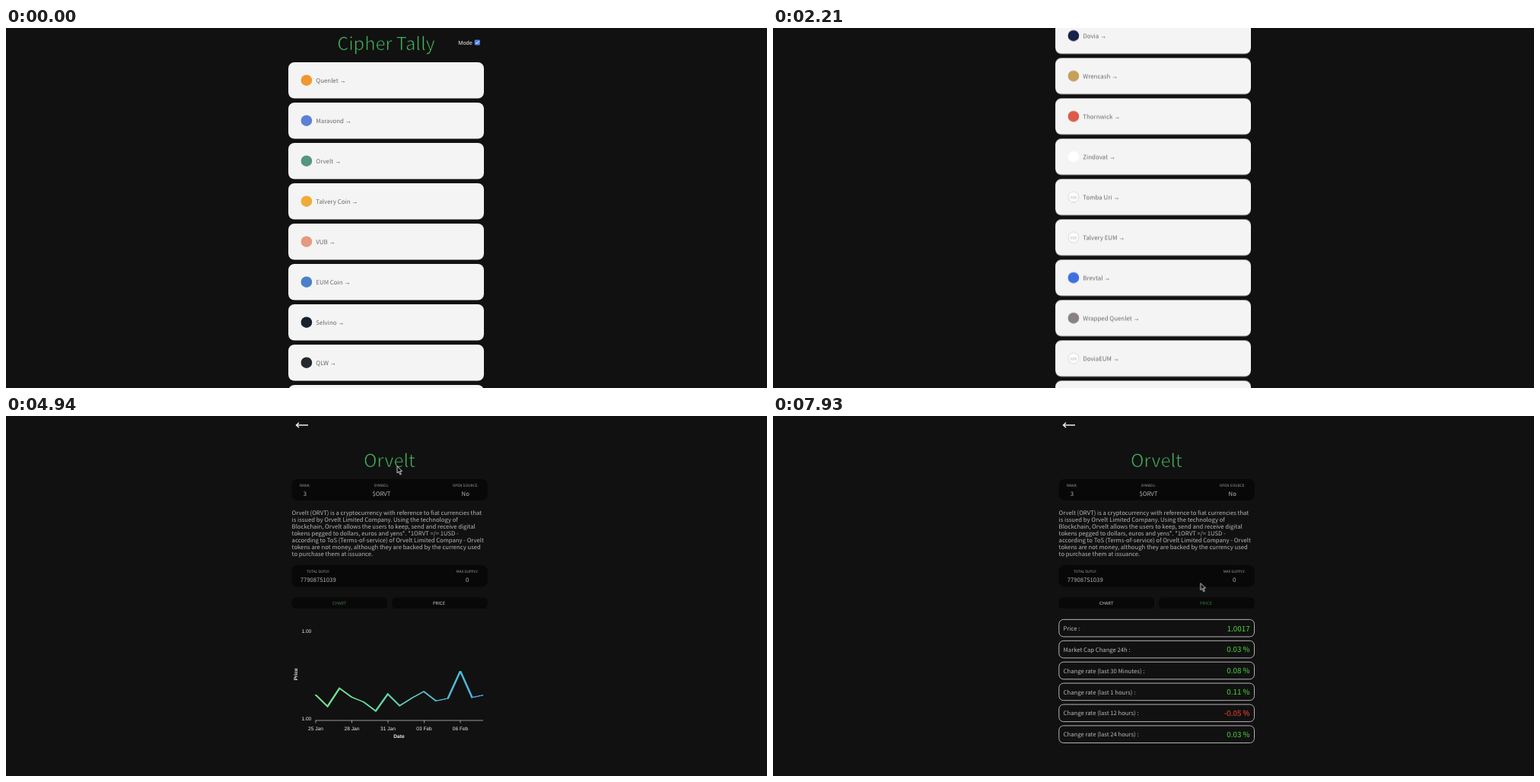
Recreate the animation shown at these times as an HTML page. Size 1000 by 473 pixels, loop 8000 ms.

```html
<!DOCTYPE html>
<html lang="en">
<head>
<meta charset="utf-8">
<title>Coin tracker</title>
<style>
  html, body { margin: 0; width: 100%; height: 100%; overflow: hidden; background: #111; }
  svg { display: block; width: 100vw; height: 100vh; }
  text {
    font: 300 7.7px "Noto Sans CJK JP", "Noto Sans CJK SC", "Open Sans", sans-serif;
    fill: #b8b8b8;
    text-rendering: geometricPrecision;
    white-space: pre;
  }
  .mid { text-anchor: middle; }
  .end { text-anchor: end; }
  /* The background-coloured outline thins the letters. */
  .title { font-size: 23.5px; fill: #45b15d; stroke: #111; stroke-width: .65; text-anchor: middle; }
  .label { font-size: 4.8px; fill: #a0a0a0; text-anchor: middle; }
  .tab { font-size: 5.75px; text-anchor: middle; }
  .name { font-size: 7.9px; font-weight: 400; fill: #6a6a6a; }
  .name tspan { font: 8px "Liberation Sans", Arial, sans-serif; fill: #333; }
  .value { font-size: 9.8px; font-weight: 400; fill: #4cd63c; text-anchor: end; }
  .value.down { fill: #c03e2e; stroke: #a83426; stroke-width: .35; }
  .axis { font: 6.6px "Liberation Sans", Arial, sans-serif; fill: #eee; }
  .bold { font-weight: 700; }
  .tiny { font-size: 1.8px; fill: #777; text-anchor: middle; }
  .panel { fill: #080808; }
  .row { fill: none; stroke: #b4b4b4; }

  .home, .scroll, .detail, .loading, .info, .wait, .chart, .line, .prices,
  .cursor, .hand, .arrow, .chartTab, .priceTab {
    animation: 8s step-end infinite;
  }
  .home { animation-name: home; }
  .scroll { animation-name: scroll; }
  .detail { animation-name: detail; }
  .loading { animation-name: loading; }
  .info { animation-name: info; }
  .wait { animation-name: wait; }
  .chart { animation-name: chart; }
  .line { animation-name: grow; transform-origin: 0 400px; }
  .prices { animation-name: prices; }
  .cursor { animation-name: move; }
  .hand { animation-name: hand; }
  .arrow { animation-name: arrow; }
  .chartTab { animation-name: chartTab; }
  .priceTab { animation-name: priceTab; }

  @keyframes home { 0% { opacity: 1 } 43.875%, to { opacity: 0 } }
  @keyframes scroll {
    0% { transform: translateY(0) }
    21.125% { transform: translateY(-36.2px) }
    22.75% { transform: translateY(-140px) }
    24.375% { transform: translateY(-285px) }
    26% { transform: translateY(-430px) }
    27.625% { transform: translateY(-535.6px) }
    29.25% { transform: translateY(-585px) }
    30.875% { transform: translateY(-480px) }
    32.5% { transform: translateY(-290px) }
    34.125%, to { transform: translateY(-120.6px) }
  }
  @keyframes detail { 0% { opacity: 0 } 43.875%, to { opacity: 1 } }
  @keyframes loading { 0% { opacity: 1 } 55.25%, to { opacity: 0 } }
  @keyframes info { 0% { opacity: 0 } 55.25%, to { opacity: 1 } }
  @keyframes wait { 0% { opacity: 1 } 61.75%, to { opacity: 0 } }
  @keyframes chart { 0% { opacity: 0 } 61.75% { opacity: 1 } 79.625%, to { opacity: 0 } }
  @keyframes grow { 0% { transform: scaleY(.45) } 63.375%, to { transform: none } }
  @keyframes prices { 0% { opacity: 0 } 79.625%, to { opacity: 1 } }
  @keyframes chartTab { 0% { fill: #417a4b } 79.625%, to { fill: #d0d0d0 } }
  @keyframes priceTab { 0% { fill: #d0d0d0 } 79.625%, to { fill: #38783c } }
  @keyframes move {
    0% { opacity: 0; transform: translate(540px, 140px) }
    37.375% { opacity: 1; transform: translate(530px, 74px) }
    39% { opacity: 1; transform: translate(520px, 69px) }
    40.625% { opacity: 1; transform: translate(514px, 66px) }
    68.25% { opacity: 1; transform: translate(570px, 95px) }
    69.875% { opacity: 1; transform: translate(650px, 160px) }
    71.5% { opacity: 1; transform: translate(640px, 215px) }
    73.125% { opacity: 1; transform: translate(582.5px, 244px) }
    81.25% { opacity: 1; transform: translate(605px, 262px) }
    82.875% { opacity: 1; transform: translate(645px, 285px) }
    84.5% { opacity: 1; transform: translate(664px, 280px) }
    86.125% { opacity: 1; transform: translate(640px, 262px) }
    87.75% { opacity: 1; transform: translate(600px, 240px) }
    89.375%, to { opacity: 1; transform: translate(561.8px, 219.6px) }
  }
  @keyframes hand {
    0% { opacity: 1 } 45.5% { opacity: 0 } 73.125% { opacity: 1 } 81.25%, to { opacity: 0 }
  }
  @keyframes arrow {
    0% { opacity: 0 } 45.5% { opacity: 1 } 73.125% { opacity: 0 } 81.25%, to { opacity: 1 }
  }
</style>
</head>
<body>
<svg viewBox="0 0 1000 473">
  <defs>
    <linearGradient id="stroke" gradientUnits="userSpaceOnUse" x1="407" x2="627" y1="0" y2="0">
      <stop offset="0" stop-color="#78e58c"/>
      <stop offset=".35" stop-color="#68dda0"/>
      <stop offset=".7" stop-color="#58bfd0"/>
      <stop offset="1" stop-color="#4ab2e2"/>
    </linearGradient>
    <clipPath id="plot"><path d="M405 282h224v118H405z"/></clipPath>
  </defs>

  <g class="home"><g class="scroll">
    <text class="title" x="499.5" y="29">Cipher Tally</text>
    <text class="axis" x="594.2" y="21.6" style="font-size:7.5px">Mode</text>
    <rect x="615.7" y="15.4" width="7.2" height="7.2" rx="1.3" fill="#4f83e6"/>
    <path d="M617.3 19.1l1.4 1.5 2.7-3.2" fill="none" stroke="#fff"/>
    <g id="cards"></g>
  </g></g>

  <g class="detail">
    <path d="M397 12H381.5M385 8.8L381.5 12l3.5 3.2" fill="none" stroke="#eee" stroke-width="1.5"/>
    <text class="title" x="504" y="67">Orvelt</text>
    <text class="loading mid" x="503.7" y="90.6">loading...</text>

    <g class="info">
      <rect class="panel" x="375.5" y="83" width="257.3" height="28" rx="8"/>
      <rect class="panel" x="375.5" y="196" width="257.3" height="28.5" rx="8"/>
      <rect class="panel" x="375.5" y="238.5" width="125.5" height="14.5" rx="5.5"/>
      <rect class="panel" x="507" y="238.5" width="125.8" height="14.5" rx="5.5"/>
      <g id="facts"></g>
      <g id="about"></g>
      <text class="tab chartTab" x="438.2" y="247.8">CHART</text>
      <text class="tab priceTab" x="569" y="247.8">PRICE</text>
      <text class="wait mid" x="503.7" y="275">loading...</text>

      <g class="chart">
        <g clip-path="url(#plot)">
          <polyline class="line" fill="none" stroke="url(#stroke)" stroke-width="2.7" points="406.8,325
            422.5,359 438.2,306 454.3,332 470,346 485.8,372.5 501.7,323 517.3,357 533.4,334.5
            549,315.5 565,343 580.7,335.5 597,256 612.5,333 627,326"/>
        </g>
        <path d="M406.5 400H627" stroke="#aaa" stroke-width=".9"/>
        <g id="dates"></g>
        <text class="axis end" x="401.3" y="285">1.00</text>
        <text class="axis end" x="401.3" y="400">1.00</text>
        <text class="axis bold mid" x="516.5" y="423.2">Date</text>
        <text class="axis bold mid" transform="translate(383 339.3) rotate(-90)">Price</text>
      </g>

      <g class="prices" id="prices"></g>
    </g>
  </g>

  <g class="cursor">
    <path class="hand" fill="#eee" d="M-.9.5Q0-.6.9.5V3.6L4 4.5Q5 5 4.7 6.5L4 10H-.3L-3 6.6Q-3.2 5.3-1.9 5.6L-.9 6.4Z"/>
    <path class="arrow" fill="#111" stroke="#ddd" stroke-width=".9" d="M0 0V9L2.2 7 3.8 11 5.4 10.3 3.7 6.5 6.6 6.3Z"/>
  </g>
</svg>
<script>
  const fill = (id, items, draw) => {
    document.getElementById(id).innerHTML = items.map(draw).join('');
  };
  const text = (cls, x, y, str) => `<text class="${cls}" x="${x}" y="${y}">${str}</text>`;

  // An empty colour stands for a coin without an image.
  const coins = [
    ['Quenlet', '#f0982f'], ['Maravond', '#5f7fd6'], ['Orvelt', '#559683'],
    ['Talvery Coin', '#f0aa38'], ['VUB', '#e49a80'], ['EUM Coin', '#4a80cc'],
    ['Selvino', '#17222f'], ['QLW', '#23292f'], ['Mirelo', '#060606', true],
    ['Dovia', '#17244a'], ['Wrencash', '#c6a05a'], ['Thornwick', '#de5a48'],
    ['Zindovat', '#fff'], ['Tomba Uri', ''], ['Talvery EUM', ''],
    ['Brevtal', '#3f70dc'], ['Wrapped Quenlet', '#8a8280'], ['DoviaEUM', ''],
    ['Lumdrax', '#4a6a9c'], ['Ostrivane', '#2f3550'], ['Pelquin', '#d8a040']
  ];

  const icon = (color, square, y) => {
    if (square) return `<rect x="387.8" y="${y - 7}" width="14.2" height="14" fill="${color}"/>`;
    if (color) return `<circle cx="394.9" cy="${y}" r="7.3" fill="${color}"/>`;
    return `<circle cx="394.9" cy="${y}" r="6.9" fill="#fff" stroke="#ccc" stroke-width=".7"/>` +
      text('tiny', 394.9, y - .2, 'NO IMAGE') + text('tiny', 394.9, y + 2, 'AVAILABLE');
  };

  fill('cards', coins, ([name, color, square], i) => {
    const y = 68.7 + 53 * i;
    return `<rect x="371" y="${y - 23.8}" width="257" height="47.6" rx="8" fill="#f4f4f4"/>` +
      icon(color, square, y) +
      text('name', 407.3, y + 2.9, `${name} <tspan>→</tspan>`);
  });

  fill('facts', [
    [393, 92.6, 'RANK:', '3'], [493.4, 92.6, 'SYMBOL:', '$ORVT'],
    [603.7, 92.6, 'OPEN SOURCE:', 'No'], [410.2, 205.9, 'TOTAL SUPLY:', '77908751039'],
    [606.2, 205.9, 'MAX SUPPLY:', '0']
  ], ([x, y, label, value]) => text('label', x, y, label) + text('mid', x, y + 11.9, value));

  fill('about', [
    'Orvelt (ORVT) is a cryptocurrency with reference to fiat currencies that',
    'is issued by Orvelt Limited Company. Using the technology of',
    'Blockchain, Orvelt allows the users to keep, send and receive digital',
    'tokens pegged to dollars, euros and yens*. *1ORVT =/= 1USD -',
    'according to ToS (Terms-of-service) of Orvelt Limited Company - Orvelt',
    'tokens are not money, although they are backed by the currency used',
    'to purchase them at issuance.'
  ], (str, i) => text('', 375.6, 130.2 + 8.97 * i, str));

  fill('dates', ['25 Jan', '28 Jan', '31 Jan', '03 Feb', '06 Feb'], (str, i) => {
    const x = 407 + 47.5 * i;
    return `<path d="M${x} 400v3.4" stroke="#aaa" stroke-width=".9"/>` +
      text('axis mid', x, 413, str);
  });

  fill('prices', [
    ['Price', '1.0017'], ['Market Cap Change 24h', '0.03 %'],
    ['Change rate (last 30 Minutes)', '0.08 %'], ['Change rate (last 1 hours)', '0.11 %'],
    ['Change rate (last 12 hours)', '-0.05 %'], ['Change rate (last 24 hours)', '0.03 %']
  ], ([label, value], i) => {
    const y = 267.4 + 27.9 * i;
    return `<rect class="row" x="375.8" y="${y}" width="256.7" height="22.6" rx="6"/>` +
      text('', 381.6, y + 14.4, label + ' :') +
      text(value < '0' ? 'value down' : 'value', 626.6, y + 15.1, value);
  });
</script>
</body>
</html>
```
